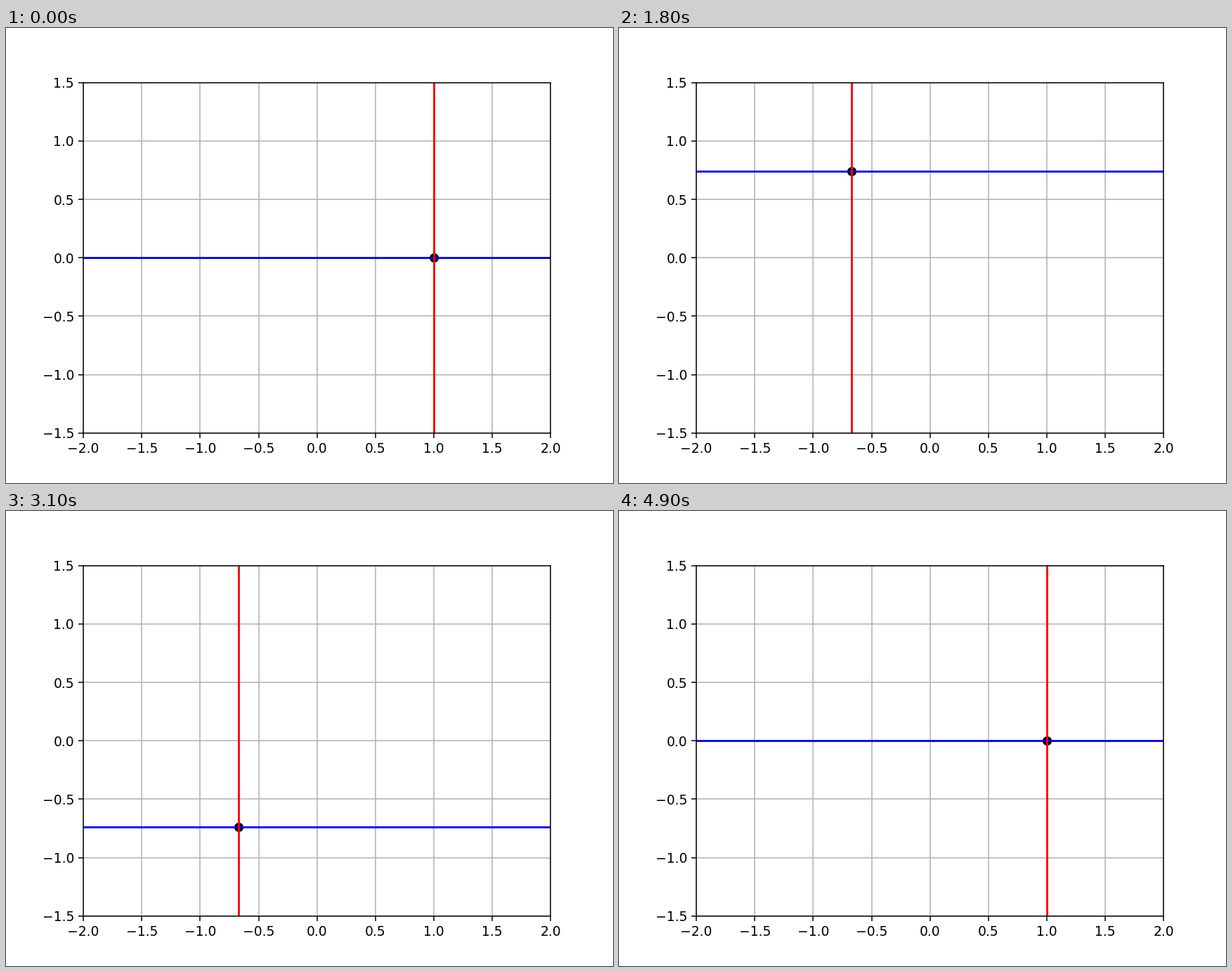
A matplotlib script that plays this animation: 864x648 px, repeating every 5000 ms.

```python
import numpy as np
import matplotlib.pyplot as plt
from matplotlib.animation import FuncAnimation

FRAMES = 50
INTERVAL = 100
X_LIMITS = (-2, 2)
Y_LIMITS = (-1.5, 1.5)

angles = np.linspace(0, 2 * np.pi, FRAMES)

fig, ax = plt.subplots(figsize=(6.4, 4.8), dpi=135)
ax.set_aspect("equal")
ax.set_xlim(*X_LIMITS)
ax.set_ylim(*Y_LIMITS)
ax.grid(True)

point, = ax.plot([], [], "ko")
horizontal, = ax.plot([], [], "b-")
vertical, = ax.plot([], [], "r-")


def update(frame):
    """Move the crosshair and its point once around the unit circle."""
    x, y = np.cos(angles[frame]), np.sin(angles[frame])
    point.set_data([x], [y])
    horizontal.set_data(X_LIMITS, [y, y])
    vertical.set_data([x, x], Y_LIMITS)
    return point, horizontal, vertical


animation = FuncAnimation(fig, update, frames=FRAMES, interval=INTERVAL,
                          repeat=True, repeat_delay=0)

plt.show()
```
